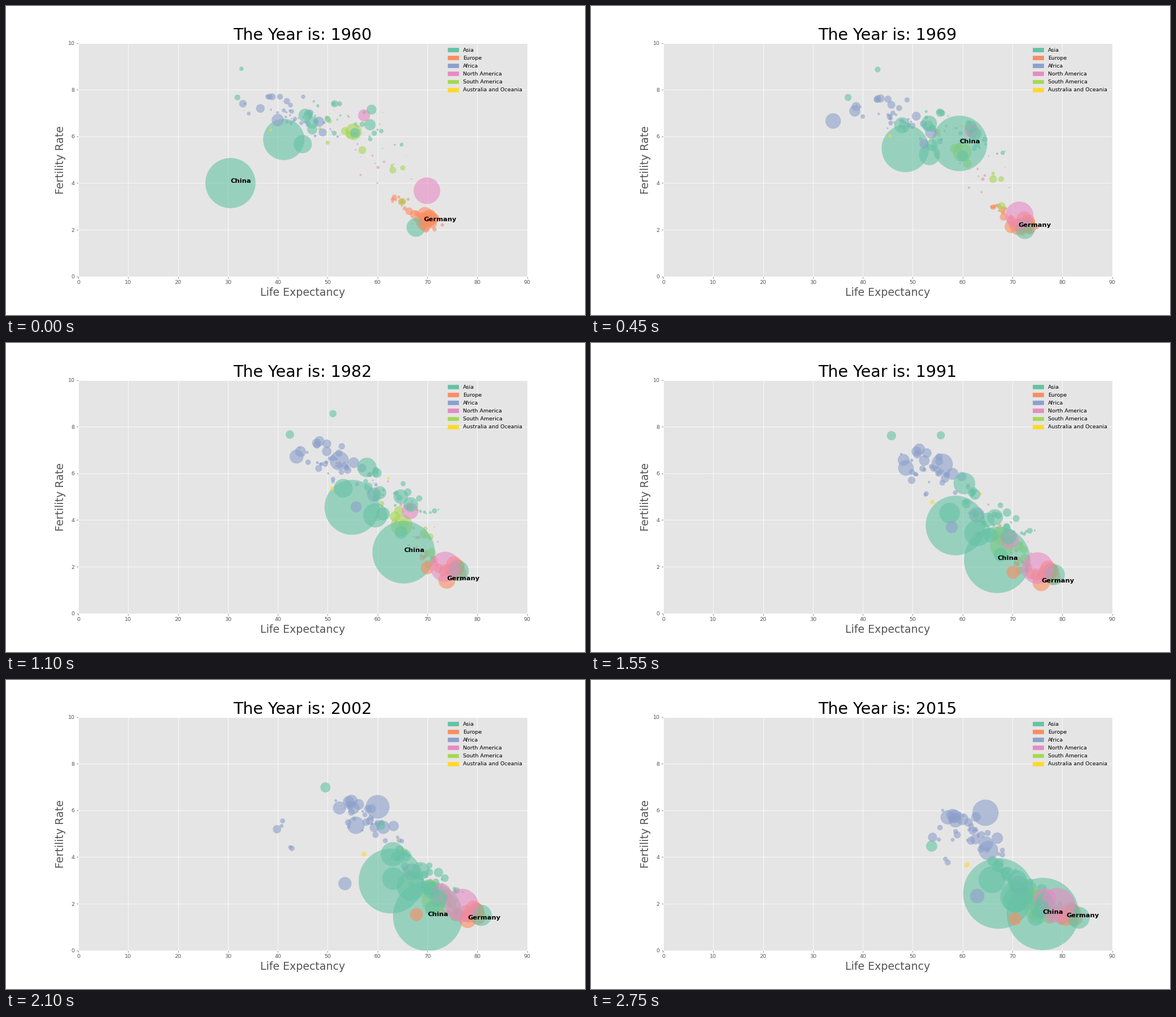
Write a matplotlib script that moves like this. It is 1025 px wide and 547 px high and loops after 2.8 s.

```python
import numpy as np
import matplotlib.pyplot as plt
from matplotlib.animation import FuncAnimation
from matplotlib.patches import Patch

WIDTH, HEIGHT, DPI = 1025, 547, 64
K = 68.35 / DPI             # point scale of the chart
RADIUS = 1.725              # bubble radius in pixels for one million people
YEARS = np.arange(1960, 2016)
T = np.linspace(0, 1, len(YEARS))

COLORS = {
    "Asia": "#66c2a5", "Europe": "#fc8d62", "Africa": "#8da0cb",
    "North America": "#e78ac3", "South America": "#a6d854",
    "Australia and Oceania": "#ffd92f",
}
AS, EU, AF, NA, SA, OC = COLORS
rng = np.random.default_rng(7)
bubbles = []


def glide(start, end, mid, width=12):
    """S-curve from start to end, steepest in the year mid."""
    s = 1 / (1 + np.exp((mid - YEARS) / width))
    return start + (end - start) * (s - s[0]) / (s[-1] - s[0])


def add(continent, pop, life, fert):
    bubbles.append((COLORS[continent], life, fert, pop))


def country(continent, pop, life, fert, mid, width=12, bend=.8, dip=(2000, 0)):
    """Each pair runs from 1960 to 2015; dip is a passing loss of life years."""
    year, depth = dip
    loss = depth * np.exp(-((YEARS - year) / 5) ** 2)
    add(continent, pop[0] + (pop[1] - pop[0]) * T,
        life[0] + (life[1] - life[0]) * T ** bend - loss,
        glide(*fert, mid, width))


def group(continent, count, pop, growth, life, fert, mid, spread=.9, depth=0):
    """Seeded countries; healthier ones have fewer children within each range."""
    for _ in range(count):
        u = rng.random()
        lives = [lo + (hi - lo) * np.clip(u + rng.normal(0, .12), 0, 1) for lo, hi in life]
        ferts = [hi - (hi - lo) * np.clip(u + rng.normal(0, .2), 0, 1) for lo, hi in fert]
        size = pop * np.exp(rng.normal(0, spread))
        country(continent, (size, size * growth), lives, ferts,
                mid + rng.normal(0, 4), dip=(2002, depth))


# Small countries
group(AF, 24, 2, 3.6, [(33, 52), (56, 68)], [(5.9, 7.4), (4.1, 6)], 1997)
group(AS, 22, 1.2, 3.6, [(45, 65), (68, 80)], [(5.4, 7.5), (1.7, 3.4)], 1987)
group(EU, 24, 3, 1.2, [(63, 73), (75, 82)], [(1.9, 3.4), (1.3, 1.9)], 1974)
group(NA, 18, 1, 2.4, [(46, 68), (70, 79)], [(4, 7.4), (1.7, 3)], 1980)
group(SA, 7, 3, 2.8, [(46, 66), (70, 78)], [(4.5, 6.9), (1.9, 2.9)], 1980)
group(OC, 8, .15, 2, [(48, 63), (64, 73)], [(5.5, 7.3), (3, 4.3)], 1988)
# Middle-sized countries
group(AF, 12, 7, 4, [(38, 50), (58, 67)], [(6.4, 7.7), (4, 5.8)], 1998, .3)
group(AF, 5, 2, 4, [(42, 50), (54, 60)], [(6, 7.1), (3, 5.4)], 1990, .4, 12)
group(AS, 8, 7, 3.4, [(50, 60), (67, 77)], [(5.6, 7.4), (2, 3.8)], 1986, .3)
group(EU, 6, 20, 1.2, [(66, 71), (74, 80)], [(2.2, 3), (1.3, 1.5)], 1978, .4)
group(EU, 4, 50, 1.25, [(69, 71), (81, 82.5)], [(2.4, 2.8), (1.4, 2)], 1972, .1)
group(SA, 5, 12, 2.8, [(52, 65), (74, 77)], [(3.2, 6.8), (1.9, 2.4)], 1978, .3)

# Bubbles that stand out
country(AS, (9, 33), (31.9, 53.8), (7.67, 4.47), 2008, 4)
country(AS, (48, 161), (45.5, 70.6), (6.9, 2.15), 1990, bend=1.3)
country(SA, (72, 206), (55.2, 75.3), (6.2, 1.77), 1976)

china_years = (1960, 1961, 1963, 1969, 1974, 1978, 1982, 1991, 2002, 2015)
china_life = np.interp(YEARS, china_years,
                       (30.5, 33, 52, 59.4, 60.6, 63, 65.25, 66.95, 70.1, 76.1))
china_fert = np.interp(YEARS, china_years,
                       (4, 3.3, 7.5, 5.7, 4.15, 2.75, 2.62, 2.29, 1.47, 1.56))
add(AS, glide(662, 1376, 1971, 19), china_life, china_fert)

country(AF, (27, 91), (48.3, 71.3), (6.63, 2.8), 1985)
country(AF, (20, 99), (36.5, 65.2), (7.2, 4.28), 2004, bend=1.5)

germany_years = (1960, 1969, 1974, 1982, 1991, 2002, 2015)
germany_life = 69.3 + 11.5 * T
germany_fert = np.interp(YEARS, germany_years, (2.37, 2.13, 1.58, 1.42, 1.32, 1.33, 1.43))
add(EU, 73 + 8 * T, germany_life, germany_fert)

country(AS, (450, 1313), (41.2, 67.2), (5.87, 2.44), 1986, bend=.7)
country(AS, (88, 258), (45, 70.7), (5.67, 2.3), 1983, bend=.62)
country(AS, (22, 79), (46.1, 76), (6.93, 1.75), 1989)
country(AS, (93, 127), (67.7, 83.3), (2.1, 1.4), 1985, bend=.65)
country(NA, (38, 126), (57.3, 76.5), (6.9, 2.2), 1980, 8)
country(AF, (40, 182), (41, 64.6), (6.7, 5.9), 2000, dip=(1968, 13))
country(AS, (40, 189), (46.9, 65.9), (6.6, 3.03), 1998, 7, bend=.6)
country(OC, (2, 7.6), (38.6, 60.9), (6.28, 3.67), 1988, bend=.65)
country(AS, (26, 101), (58.8, 71), (7.15, 3), 1978)
country(AF, (17, 55), (49, 63), (6.17, 2.33), 1984, dip=(2004, 8))
country(AS, (27, 68), (55.5, 74.7), (6.15, 1.4), 1975)
country(AS, (27, 78), (46.9, 76.5), (6.3, 2.1), 1980)
country(EU, (43, 45), (69.5, 70.5), (2.2, 1.35), 1992, dip=(2002, 2.5))
country(NA, (186, 321), (69.9, 79.1), (3.67, 1.93), 1964, 5, bend=1)
country(AS, (33, 93), (58.5, 75.5), (6.5, 1.8), 1985, 8)
country(AS, (5, 27), (32.7, 66), (8.9, 3.83), 1998, 6, bend=.65)

colors = [b[0] for b in bubbles]
life, fert, people = (np.array([b[i] for b in bubbles]) for i in (1, 2, 3))
areas = (2 * RADIUS * 72 / DPI) ** 2 * people

plt.rcParams.update({
    "font.family": "DejaVu Sans", "font.size": 10 * K,
    "axes.axisbelow": True,
    "xtick.major.size": 3.5 * K, "ytick.major.size": 3.5 * K,
    "xtick.major.width": .8 * K, "ytick.major.width": .8 * K,
    "xtick.major.pad": 3.5 * K, "ytick.major.pad": 3.5 * K,
    "xtick.color": "#555555", "ytick.color": "#555555",
})

fig = plt.figure(figsize=(WIDTH / DPI, HEIGHT / DPI), dpi=DPI, facecolor="white")
ax = fig.add_axes([.125, .125, .775, .755], facecolor="#E5E5E5")
ax.set(xlim=(0, 90), ylim=(0, 10), xticks=range(0, 91, 10), yticks=range(0, 11, 2))
ax.grid(color="white", linewidth=.8 * K)
for spine in ax.spines.values():
    spine.set(color="white", linewidth=K)
label_style = dict(fontsize=20 * K, color="#555555", labelpad=4 * K)
ax.set_xlabel("Life Expectancy", **label_style)
ax.set_ylabel("Fertility Rate", **label_style)
title = ax.set_title("", fontsize=30 * K, pad=6 * K)
ax.legend(handles=[Patch(color=c, label=name, linewidth=.8 * K) for name, c in COLORS.items()],
          loc="upper right", frameon=False, labelspacing=.53, handleheight=.75)

cloud = ax.scatter(life[:, 0], fert[:, 0], s=areas[:, 0], c=colors, alpha=.6, linewidths=0)
tag_style = dict(fontsize=12 * K, fontweight="bold")
tags = [(ax.text(0, 0, "China", **tag_style), china_life, china_fert),
        (ax.text(0, 0, "Germany", **tag_style), germany_life, germany_fert)]


def update(n):
    title.set_text(f"The Year is: {YEARS[n]}")
    cloud.set_offsets(np.column_stack((life[:, n], fert[:, n])))
    cloud.set_sizes(areas[:, n], dpi=fig.dpi)
    for tag, x, y in tags:
        tag.set_position((x[n], y[n]))
    return [title, cloud, *(tag for tag, _, _ in tags)]


anim = FuncAnimation(fig, update, frames=len(YEARS), interval=50, repeat=True,
                     init_func=lambda: update(0), blit=False)
plt.show()
```
